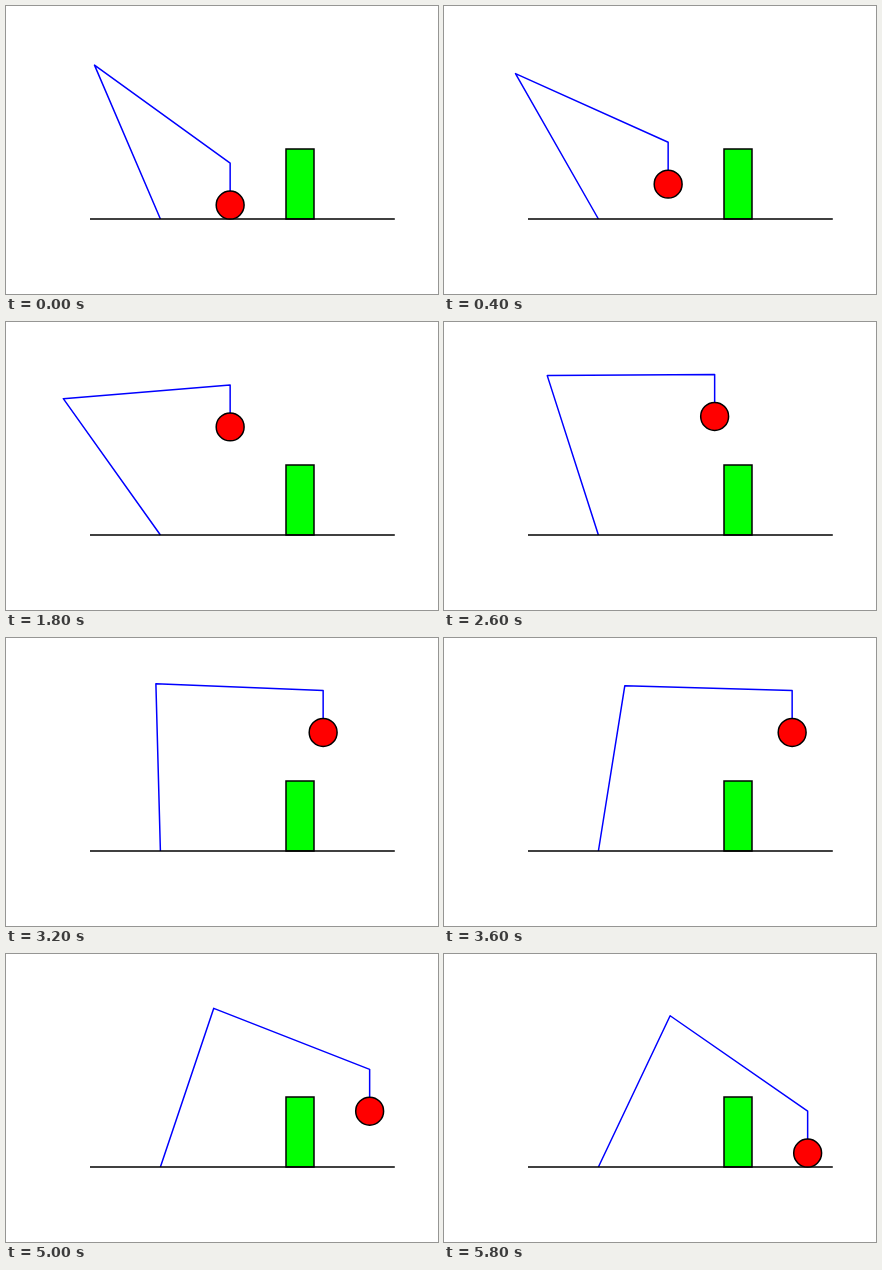
An HTML page that plays this animation: 432x288 px, repeating every 6000 ms.

```html
<!DOCTYPE html>
<html lang="en">
<head>
<meta charset="utf-8">
<title>Crane arm</title>
<style>
  html, body { margin: 0; width: 100%; height: 100%; overflow: hidden; background: #fff; }
  svg { display: block; width: 100%; height: 100%; }
  svg * { stroke: #000; stroke-width: 1.5; }
  #arm { fill: none; stroke: #00f; stroke-linejoin: round; }
</style>
</head>
<body>
<svg viewBox="0 0 432 288">
  <rect x="280" y="143" width="28" height="70" fill="#0f0"/>
  <polyline id="arm"/>
  <line x1="84" y1="213" x2="388.8" y2="213"/>
  <circle id="ball" r="13.95" fill="#f00"/>
</svg>
<script>
  const UNIT = 13.95, BASE_X = 154.4, BASE_Y = 213;
  const LINK = 12, ROD = 2, RADIUS = 1, LIFT = 7.5;
  const STEP_MS = 200, STEPS = 30;
  const arm = document.getElementById('arm');
  const ball = document.getElementById('ball');

  // Ball centre in units from the base: lift, carry, lower.
  function ballAt(step) {
    if (step <= 10) return [5, RADIUS + LIFT * step / 10];
    if (step <= 19) return [5 + 10 * (step - 10) / 9, RADIUS + LIFT];
    return [15, RADIUS + LIFT * (29 - step) / 10];
  }

  // Joint of two equal links reaching from the base to (x, y), bent upward.
  function elbow(x, y) {
    const d = Math.hypot(x, y);
    const k = Math.sqrt(LINK * LINK - d * d / 4) / d;
    return [x / 2 - y * k, y / 2 + x * k];
  }

  const toStage = ([x, y]) => [BASE_X + x * UNIT, BASE_Y - y * UNIT];

  function draw(step) {
    const [x, y] = ballAt(step);
    const top = y + RADIUS, tip = top + ROD;
    const points = [[0, 0], elbow(x, tip), [x, tip], [x, top]];
    arm.setAttribute('points', points.map(toStage).join(' '));
    const [cx, cy] = toStage([x, y]);
    ball.setAttribute('cx', cx);
    ball.setAttribute('cy', cy);
  }

  const start = performance.now();
  function tick() {
    draw(Math.floor((performance.now() - start) / STEP_MS) % STEPS);
    requestAnimationFrame(tick);
  }
  tick();
</script>
</body>
</html>
```
